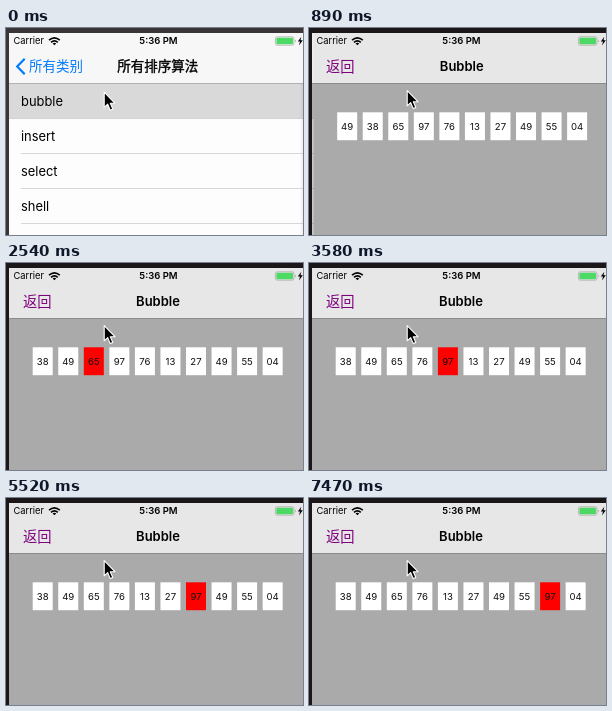
Animation of 297 by 207 pixels, one loop 8 s. Source, as an HTML page:

```html
<!DOCTYPE html>
<html lang="zh">
<head>
<meta charset="utf-8">
<title>Bubble sort</title>
<style>
  html, body { margin: 0; width: 100%; height: 100%; overflow: hidden; background: #1b1617; }
  svg { display: block; width: 100vw; height: 100vh; }
  text { font-family: Inter, "Noto Sans CJK SC", "Noto Sans CJK", sans-serif; }
  .row { font-size: 12.9px; }
  .cjk { font-size: 13.5px; font-family: "Noto Sans CJK SC", "Noto Sans CJK", sans-serif; }
  .title { font-weight: 600; text-anchor: middle; }
  #listTitle { font-weight: 400; stroke: #000; stroke-width: .35px; }
  .cell text { font-size: 9.6px; text-anchor: middle; fill: #111; }
</style>
</head>
<body>
<svg viewBox="0 0 297 207">
  <defs>
    <clipPath id="screen"><rect x="3" y="5" width="294" height="202"/></clipPath>
    <linearGradient id="shade">
      <stop offset="0" stop-opacity="0"/>
      <stop offset="1" stop-opacity=".15"/>
    </linearGradient>
  </defs>
  <rect id="frame" width="297" height="207"/>
  <g clip-path="url(#screen)">
    <g id="list"><rect x="3" y="4" width="298" height="203" fill="#fdfdfd"/></g>
    <rect id="dim" width="297" height="207"/>
    <g id="page">
      <rect x="-4" y="4" width="7" height="203" fill="url(#shade)"/>
      <rect x="3" y="4" width="298" height="203" fill="#aaa"/>
    </g>
    <rect x="3" y="4" width="294" height="51" fill="#f7f7f7" fill-opacity=".8"/>
    <rect x="3" y="55" width="294" height=".6" fill-opacity=".3"/>

    <g id="listNav">
      <path d="M18.7 30.7 L11.2 38.5 L18.7 46.3" fill="none" stroke="#007aff" stroke-width="2.2"/>
      <text class="cjk" x="23" y="43.4" fill="#007aff">所有类别</text>
    </g>
    <text id="listTitle" class="cjk title" x="151.7" y="43.4">所有排序算法</text>
    <text id="pageNav" class="cjk" x="17" y="43.8" fill="#7f007f" style="font-size:14.3px">返回</text>
    <text id="pageTitle" class="title" x="152" y="43.2" font-size="13">Bubble</text>

    <text x="7.5" y="16.4" font-size="9.3">Carrier</text>
    <g fill="none" stroke="#000" stroke-width="1.6">
      <path d="M43 12.2 Q48.4 7.6 53.8 12.2"/>
      <path d="M45 14.3 Q48.4 11.4 51.8 14.3"/>
    </g>
    <path d="M46.6 15.4 Q48.4 14 50.2 15.4 L48.4 17.2 Z"/>
    <text class="title" x="152.5" y="16.4" font-size="9.5">5:36 PM</text>
    <rect x="269.4" y="8.8" width="18.6" height="8.4" rx="2" fill="none" stroke="#a2a2a2" stroke-width=".7"/>
    <rect x="270.4" y="9.8" width="16.6" height="6.4" rx="1.2" fill="#4cd964"/>
    <path d="M289 11.4 Q290.8 13 289 14.6 Z" fill="#a2a2a2"/>
    <path d="M295.3 8.8 L291.8 13.6 H294 L293 17.4 L296.8 12.3 H294.5 Z"/>
  </g>
  <path id="cursor" d="M0 0 V15.2 L3.5 12 L6 18 L8.6 16.9 L6.1 11.1 H10.8 Z"
        stroke="#fff" stroke-width="1.1" stroke-linejoin="round"/>
</svg>
<script>
const LOOP = 8000;
const PITCH = 25.55;
const PUSH_START = 440, PUSH_RATE = 0.0165;
const SWAP_TIME = 500;
const values = ["49", "38", "65", "97", "76", "13", "27", "49", "55", "04"];
// Each swap: [start, index moving right, index moving left]
const swaps = [[960, 0, 1], [2960, 3, 4], [3960, 3, 5], [4960, 3, 6], [5960, 3, 7], [6960, 3, 8]];

const byId = id => document.getElementById(id);
const [frame, list, dim, page, listNav, listTitle, pageNav, pageTitle, cursor] =
  ["frame", "list", "dim", "page", "listNav", "listTitle", "pageNav", "pageTitle", "cursor"].map(byId);

function add(parent, tag, attributes, text = "") {
  const node = document.createElementNS("http://www.w3.org/2000/svg", tag);
  for (const name in attributes) node.setAttribute(name, attributes[name]);
  node.textContent = text;
  return parent.appendChild(node);
}

add(list, "rect", { x: 3, y: 55, width: 298, height: 35.5, fill: "#d9d9d9" });
["bubble", "insert", "select", "shell"].forEach((name, i) => {
  const top = 55.5 + i * 35;
  add(list, "text", { class: "row", x: 15, y: top + 22 }, name);
  add(list, "rect", { x: i ? 15 : 3, y: top + 34.5, width: 298, height: .7, fill: "#c8c7cc" });
});

const cells = values.map(value => {
  const group = add(page, "g", { class: "cell" });
  const box = add(group, "rect", { y: 84.3, width: 20, height: 27.9 });
  add(group, "text", { x: 10, y: 101.8 }, value);
  return { group, box };
});

const clamp = x => Math.min(1, Math.max(0, x));
const move = (node, x, y = 0) => node.setAttribute("transform", `translate(${x} ${y})`);

// cubic-bezier(.42, 0, .58, 1)
function easeInOut(x) {
  let low = 0, high = 1;
  for (let i = 0; i < 20; i++) {
    const u = (low + high) / 2, v = 1 - u;
    if (1.26 * v * v * u + 1.74 * v * u * u + u ** 3 < x) low = u; else high = u;
  }
  return low * low * (3 - 2 * low);
}

// Critically damped spring, from 1 down to 0
function pushRemaining(t) {
  const x = Math.max(0, t - PUSH_START) * PUSH_RATE;
  return t > 1000 ? 0 : (1 + x) * Math.exp(-x);
}

function redCell(t) {
  if (t < 960) return -1;
  return t < 2460 ? 0 : t < 2960 ? 2 : 3;
}

function draw(t) {
  const away = pushRemaining(t), done = 1 - away;
  const border = [[27, 58], [22, 54], [23, 55]].map(([end, start]) => end + (start - end) * away);
  frame.setAttribute("fill", `rgb(${border})`);
  move(list, -89 * done);
  dim.setAttribute("opacity", .1 * done);
  move(page, 298 * away);
  move(listTitle, -110 * done);
  move(pageTitle, 149 * away);
  listNav.setAttribute("opacity", clamp(1 - 2 * done));
  listTitle.setAttribute("opacity", clamp(1 - 1.5 * done));
  pageNav.setAttribute("opacity", done);
  pageTitle.setAttribute("opacity", done);
  move(cursor, 98.2, t < 300 ? 64.2 : 62.6);

  const slots = values.map((_, i) => i);
  for (const [start, right, left] of swaps) {
    const shift = easeInOut(clamp((t - start) / SWAP_TIME));
    slots[right] += shift;
    slots[left] -= shift;
  }
  const red = redCell(t);
  cells.forEach(({ group, box }, i) => {
    move(group, 26.7 + slots[i] * PITCH);
    box.setAttribute("fill", i === red ? "#f00" : "#fff");
  });
}

const origin = performance.now();
function tick() {
  draw((performance.now() - origin) % LOOP);
  requestAnimationFrame(tick);
}
tick();
</script>
</body>
</html>
```
